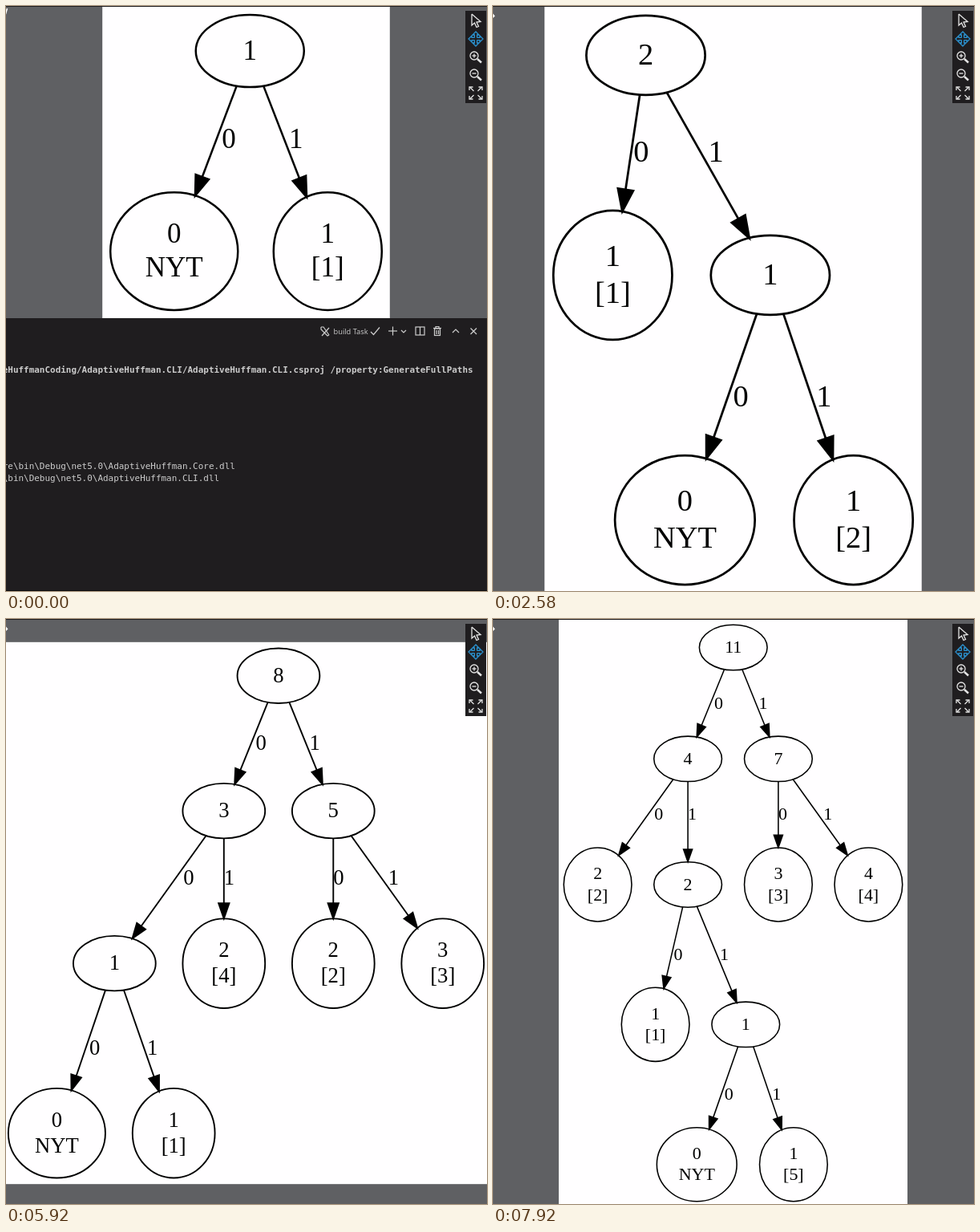
These frames come from a looping animation (600x729 px, 8000 ms). An HTML page with a canvas:

```html
<!DOCTYPE html>
<html lang="en">
<head>
<meta charset="utf-8">
<style>
  html, body { margin: 0; width: 100%; height: 100%; overflow: hidden; background: #1f1d1f; }
  canvas { display: block; }
</style>
</head>
<body>
<canvas id="stage" width="600" height="729"></canvas>
<script>
const ctx = document.getElementById('stage').getContext('2d');
const LOOP = 8000, PANEL_CLOSES = 250, RELOAD = [7080, 7170];
const DARK = '#1f1d1f', GREY = '#5f6063', LIGHT = '#cccccc';

// Graph metrics in points
const MARGIN = 4, RX = 27, NYT_RX = 31.8, INNER_RY = 18, LEAF_RY = 29.33, RANK_GAP = 52.5;

// A tree is [left, right]; a number is a leaf symbol, 0 is the NYT leaf.
// xs holds the node centres in preorder.
const shallow = [119.5, 73.4, 35.8, 112.3, 145.5];
const nested = [62.4, 47.5, 119.3, 73.3, 35.8, 112, 145.1];
const balanced = [181.1, 145.3, 73.6, 35.8, 112.4, 145.3, 217, 217, 288.7];
const steps = [
  { at: 0, n: 1, tree: [0, 1], xs: [73.6, 35.8, 112.4] },
  { at: 1920, n: 2, tree: [1, [0, 2]], xs: [46, 31, 102.6, 63.8, 140.4] },
  { at: 3000, n: 3, tree: [[0, 1], 2], xs: shallow },
  { at: 3580, n: 4, tree: [2, [1, [0, 3]]], xs: [46, 31, 103, 77, 149, 110, 187] },
  { at: 4000, n: 5, tree: [2, [[0, 1], 3]], xs: nested },
  { at: 4500, n: 6, tree: [3, [[0, 1], 2]], xs: nested },
  { at: 5250, n: 7, tree: [3, [2, [1, [0, 4]]]], xs: [46, 31, 103, 77, 149, 123, 195, 156, 233] },
  { at: 5830, n: 8, tree: [[[0, 1], 4], [2, 3]], xs: balanced },
  { at: 6330, n: 9, tree: [[[0, 1], 2], [4, 3]], xs: balanced },
  { at: 6750, n: 10, tree: [4, [3, [[0, 1], 2]]], xs: [46, 31, 103, 77, 149, 103, 65, 142, 175] },
  { at: 7670, n: 11, tree: [[2, [1, [0, 5]]], [3, 4]],
    xs: [138.8, 102.7, 31, 102.7, 76.9, 148.7, 109.8, 186.7, 174.6, 174.6, 246.3] }
];

// Symbols arrive as 1, 2 2, 3 3 3, ...
const leafWeight = (symbol, n) =>
  Math.max(0, Math.min(symbol, n - symbol * (symbol - 1) / 2));

function layout({ n, tree, xs }) {
  const nodes = [], edges = [], ranks = [];
  function visit(item, rank) {
    const leaf = !Array.isArray(item);
    const node = { x: xs[nodes.length], rank, leaf,
                   rx: item === 0 ? NYT_RX : RX, ry: leaf ? LEAF_RY : INNER_RY };
    nodes.push(node);
    ranks[rank] = Math.max(ranks[rank] || 0, node.ry);
    if (leaf) {
      node.weight = leafWeight(item, n);
      node.name = item ? `[${item}]` : 'NYT';
    } else {
      const children = item.map(child => visit(child, rank + 1));
      children.forEach((to, bit) => edges.push({ from: node, to, bit }));
      node.weight = children[0].weight + children[1].weight;
    }
    return node;
  }
  visit(tree, 0);
  let y = MARGIN;
  const centres = ranks.map(half => {
    const centre = y + half;
    y = centre + half + RANK_GAP;
    return centre;
  });
  nodes.forEach(node => node.y = centres[node.rank]);
  edges.forEach(edge => edge.labelY = edge.to.y - ranks[edge.to.rank] - RANK_GAP / 2);
  return { nodes, edges, height: y - RANK_GAP + MARGIN,
           width: Math.max(...nodes.map(node => node.x + node.rx)) + MARGIN };
}
steps.forEach(step => step.graph = layout(step));

function line(...points) {
  ctx.beginPath();
  for (let i = 0; i < points.length; i += 2) ctx.lineTo(points[i], points[i + 1]);
  ctx.stroke();
}

function drawEdge({ from, to, bit, labelY }) {
  const dx = to.x - from.x, dy = to.y - from.y, length = Math.hypot(dx, dy);
  const reach = 1 / Math.hypot(dx / to.rx, dy / to.ry);
  const tipX = to.x - dx * reach, tipY = to.y - dy * reach;
  const ux = dx / length, uy = dy / length;
  const baseX = tipX - ux * 10, baseY = tipY - uy * 10;
  const start = 1 / Math.hypot(dx / from.rx, dy / from.ry);
  line(from.x + dx * start, from.y + dy * start, baseX, baseY);
  ctx.beginPath();
  ctx.moveTo(tipX, tipY);
  ctx.lineTo(baseX - uy * 3.5, baseY + ux * 3.5);
  ctx.lineTo(baseX + uy * 3.5, baseY - ux * 3.5);
  ctx.closePath();
  ctx.fill();
  ctx.stroke();
  const slope = dx / dy;
  const clearance = 3.5 + Math.abs(slope) * (bit ? 5.8 : 7.2);
  ctx.fillText(bit, from.x + slope * (labelY - from.y) + clearance, labelY + 4.2);
}

function drawNode({ x, y, rx, ry, leaf, weight, name }) {
  ctx.beginPath();
  ctx.ellipse(x, y, rx, ry, 0, 0, 7);
  ctx.stroke();
  ctx.fillText(weight, x, y + (leaf ? -4.2 : 4.2));
  if (leaf) ctx.fillText(name, x, y + 12.6);
}

function drawGraph({ nodes, edges, width, height }, viewHeight) {
  const viewWidth = 608.5;
  const scale = Math.min(viewWidth / width, viewHeight / height);
  ctx.fillStyle = GREY;
  ctx.fillRect(0, 1, 600, viewHeight);
  ctx.save();
  ctx.translate(299.5 - width * scale / 2, 1 + (viewHeight - height * scale) / 2);
  ctx.scale(scale, scale);
  ctx.fillStyle = '#fffeff';
  ctx.fillRect(0, 0, width, height);
  ctx.fillStyle = ctx.strokeStyle = '#000';
  ctx.lineWidth = 1;
  ctx.textAlign = 'center';
  ctx.font = '14px "Liberation Serif", serif';
  edges.forEach(drawEdge);
  nodes.forEach(drawNode);
  ctx.restore();
}

function drawMagnifier(y, plus) {
  ctx.beginPath();
  ctx.arc(584, y - 2, 5, 0, 7);
  ctx.stroke();
  line(581.5, y - 2, 586.5, y - 2);
  if (plus) line(584, y - 4.5, 584, y + 0.5);
  ctx.lineWidth = 2.4;
  line(588, y + 2, 593, y + 6.5);
  ctx.lineWidth = 1.3;
}

function drawToolbar() {
  ctx.fillStyle = DARK;
  ctx.fillRect(573, 6, 26, 115);
  ctx.strokeStyle = '#e4e4e4';
  ctx.lineWidth = 1.3;
  line(581, 10, 581, 24, 584.5, 21, 587, 26.5, 589.5, 25.5, 587, 20, 592, 19.5, 581, 10);
  drawMagnifier(64, true);
  drawMagnifier(86, false);
  for (const sx of [-1, 1]) for (const sy of [-1, 1]) {
    const at = (a, b) => [586 + sx * a, 108.5 + sy * b];
    line(...at(2.5, 2.5), ...at(7, 7));
    line(...at(3.5, 7.5), ...at(8, 7.5), ...at(8, 3.5));
  }
  ctx.strokeStyle = '#2b93d1';
  ctx.save();
  ctx.translate(586, 41);
  for (let i = 0; i < 4; i++) {
    ctx.rotate(Math.PI / 2);
    line(-1.6, 1.6, -1.6, 5, -4, 5, 0, 9, 4, 5, 1.6, 5, 1.6, 1.6);
  }
  ctx.restore();
}

function drawPanel() {
  ctx.fillStyle = DARK;
  ctx.fillRect(0, 389, 600, 340);
  ctx.fillStyle = ctx.strokeStyle = LIGHT;
  ctx.lineWidth = 1.2;
  ctx.textAlign = 'left';
  ctx.font = '9.3px "Open Sans", sans-serif';
  ctx.fillText('build Task', 408.5, 409);
  line(394, 411, 403, 401);
  line(393, 400, 396, 400, 403, 410);
  line(393, 400, 393, 403, 401, 411, 403, 410);
  line(455, 406, 458.5, 409.5, 466, 400.5);
  line(477, 405, 488, 405);
  line(482.5, 399.5, 482.5, 410.5);
  line(493, 404, 496, 407, 499, 404);
  ctx.strokeRect(511, 400, 11, 10);
  line(516.5, 400, 516.5, 410);
  line(533, 401.5, 543, 401.5);
  line(536, 401, 536, 399.5, 540, 399.5, 540, 401);
  ctx.strokeRect(534.5, 402, 7, 8.5);
  line(537, 404, 537, 409);
  line(539.5, 404, 539.5, 409);
  line(557, 407, 561, 403, 565, 407);
  line(579.5, 401.5, 587, 409);
  line(587, 401.5, 579.5, 409);
  const mono = '10.96px "DejaVu Sans Mono", monospace', left = -4.3;
  ctx.font = 'bold ' + mono;
  ctx.fillText('eHuffmanCoding/AdaptiveHuffman.CLI/AdaptiveHuffman.CLI.csproj /property:GenerateFullPaths', left, 456.5);
  ctx.font = mono;
  ctx.fillText('re\\bin\\Debug\\net5.0\\AdaptiveHuffman.Core.dll', left, 576.5);
  ctx.fillText('\\bin\\Debug\\net5.0\\AdaptiveHuffman.CLI.dll', left, 591.5);
  drawBottomEdge();
}

function drawBottomEdge() {
  ctx.fillStyle = '#0d0c0d';
  ctx.fillRect(0, 728, 600, 1);
}

function drawPointer(panelOpen) {
  ctx.strokeStyle = ctx.fillStyle = '#fff';
  ctx.lineWidth = 1.5;
  if (panelOpen) return line(1.5, 3, -0.5, 10);
  ctx.beginPath();
  ctx.moveTo(0, 9.5);
  ctx.lineTo(2.5, 12.5);
  ctx.lineTo(0, 15);
  ctx.fill();
}

function draw(time) {
  const panelOpen = time < PANEL_CLOSES;
  ctx.fillStyle = DARK;
  ctx.fillRect(0, 0, 600, 729);
  if (time >= RELOAD[0] && time < RELOAD[1]) {
    drawBottomEdge();
  } else {
    const step = steps.filter(({ at }) => at <= time).pop();
    drawGraph(step.graph, panelOpen ? 388 : 731);
    drawToolbar();
    if (panelOpen) drawPanel();
  }
  drawPointer(panelOpen);
}

const startTime = performance.now();
function tick() {
  draw((performance.now() - startTime) % LOOP);
  requestAnimationFrame(tick);
}
tick();
</script>
</body>
</html>
```
